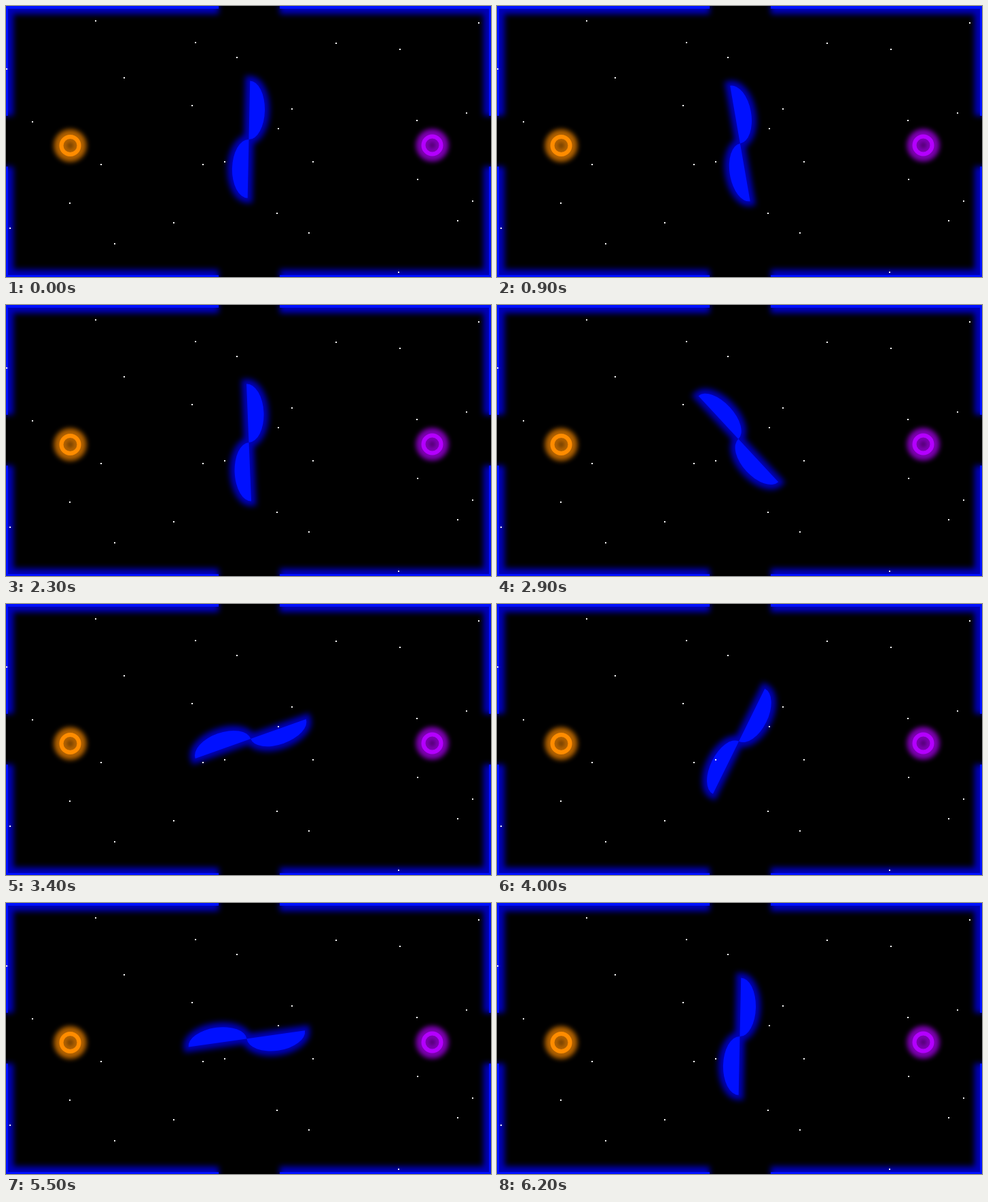
Animation, 714 px wide and 400 px high, one loop 6.3 s. Source, as an HTML page:

```html
<!DOCTYPE html>
<html lang="en">
<head>
<meta charset="utf-8">
<title>Neon arena</title>
<style>
  html, body { margin: 0; height: 100%; overflow: hidden; background: #000; }
  svg { display: block; }
  .glow { filter: blur(4px); opacity: .72; }
  .halo { filter: blur(3.5px); opacity: .7; }
</style>
</head>
<body>
<svg width="714" height="400" viewBox="0 0 714 400">
  <defs>
    <path id="walls" d="M313 1H0V162M403 1H714V162M313 400H0V237M403 400H714V237"/>
    <path id="blades" d="M0-89.5A22.5 43 0 0 1 0-3A23.5 43 0 0 0 0 83.5Z"/>
    <g id="portal" fill="none">
      <circle class="halo" r="13.5" stroke-width="21"/>
      <circle r="13" stroke-width="6"/>
    </g>
  </defs>
  <g fill="none">
    <use href="#walls" class="glow" stroke="#00f" stroke-width="22"/>
    <use href="#walls" stroke="#0010ff" stroke-width="6"/>
  </g>
  <g id="spinner">
    <use href="#blades" class="glow" fill="#00f" stroke="#00f" stroke-width="14"/>
    <use href="#blades" fill="#0010ff"/>
  </g>
  <use href="#portal" x="94.5" y="206" stroke="#ff8c00"/>
  <use href="#portal" x="627.5" y="205.5" stroke="#b400ff"/>
  <path id="stars" fill="#fff"/>
</svg>
<script>
const LOOP = 6300, STEP = 100;
// Uneven spin as [step, degrees clockwise], four turns per loop
const spin = [[0, 0], [8, 169], [16, 397], [28, 676], [39, 925], [49, 1185], [56, 1403], [61, 1440]];
const spinner = document.getElementById('spinner');

let seed = 7;
const random = () => (seed = seed * 16807 % 2147483647) / 2147483647;

// One star at a random place in each cell of a 7 by 4 grid
function starPath() {
  let path = '';
  for (let i = 0; i < 28; i++) {
    const x = Math.floor((i % 7 + random()) * 102);
    const y = Math.floor((Math.floor(i / 7) + random()) * 100);
    path += `M${x} ${y}h2v2h-2z`;
  }
  return path;
}

function angleAt(step) {
  const i = Math.max(1, spin.findIndex(([s]) => s >= step));
  const [s0, a0] = spin[i - 1], [s1, a1] = spin[i];
  return a0 + (a1 - a0) * (step - s0) / (s1 - s0);
}

function draw() {
  // The first pose is held for two steps
  const step = Math.max(0, Math.floor(performance.now() % LOOP / STEP) - 1);
  spinner.setAttribute('transform', `translate(357.4 200) rotate(${1.2 + angleAt(step)})`);
  requestAnimationFrame(draw);
}

document.getElementById('stars').setAttribute('d', starPath());
draw();
</script>
</body>
</html>
```
